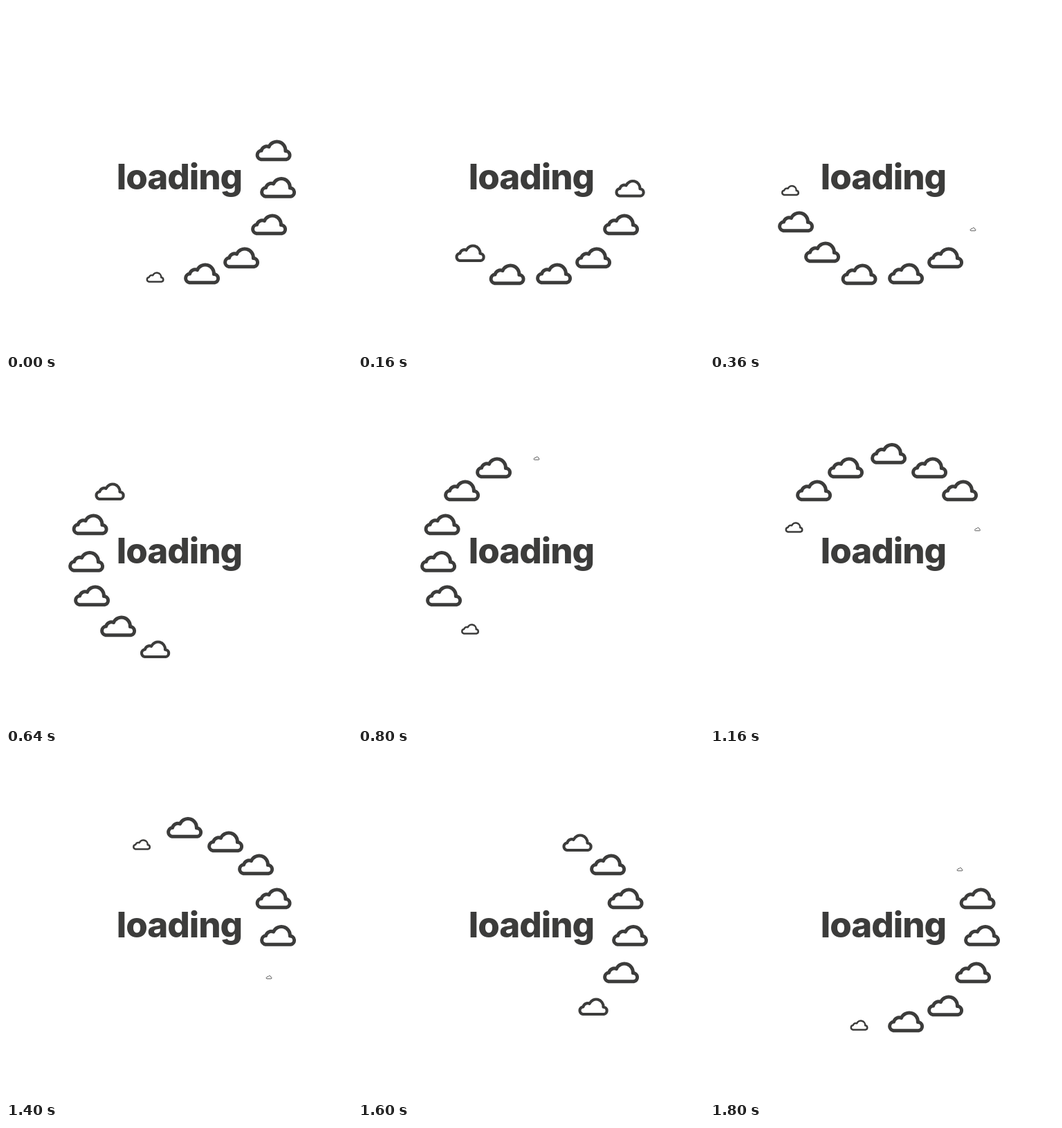
These frames come from a looping animation (500 by 500 pixels, 1.84 s). An HTML page:

```html
<!DOCTYPE html>
<html lang="en">
<head>
<meta charset="utf-8">
<title>loading</title>
<style>
  html, body { margin: 0; width: 100%; height: 100%; overflow: hidden; background: #fff; }
  svg { display: block; width: 100%; height: 100%; }
  text { font: 800 51px Inter, sans-serif; letter-spacing: -.02em; fill: #3c3c3b; text-anchor: middle; }
  path { fill: none; stroke: #3c3c3b; stroke-width: 5; stroke-linejoin: round; }
</style>
</head>
<body>
<svg viewBox="0 0 500 500"><text x="250.5" y="265">loading</text></svg>
<script>
const FRAME = 40, FRAMES = 46, STEP = 3, LEAD = 5;
const CLOUD = 'M-18 4.8H18.5A6.2 6.2 0 0 0 17.4 -7.5A12.5 12.5 0 0 0 -6.5 -13.5' +
  'A8 8 0 0 0 -17.5 -7.9A6.4 6.4 0 0 0 -18 4.8Z';

// Anchor points, clockwise from the right
const spots = [
  [386.5, 217], [393, 270.5], [380, 324], [340, 372], [283, 395],
  [215.5, 396], [162, 364], [124, 320], [116, 270.5], [121.5, 217],
  [150, 168], [196, 135], [258, 114.5], [317, 135], [361, 168]
];

const svg = document.querySelector('svg');
const clouds = spots.map(() => {
  const path = document.createElementNS(svg.namespaceURI, 'path');
  path.setAttribute('d', CLOUD);
  return svg.appendChild(path);
});

const clamp = v => Math.max(0, Math.min(1, v));

// Each cloud grows as the head of the train arrives and shrinks after its tail
function size(i, frame) {
  const grow = clamp((frame - STEP * (i - LEAD)) / STEP + .5);
  const shrink = clamp((STEP * i + 2 - frame) / STEP + .5);
  return Math.min(grow, shrink);
}

function draw() {
  const frame = Math.floor(performance.now() / FRAME) % FRAMES;
  clouds.forEach((cloud, i) => {
    const s = Math.max(size(i, frame), size(i + spots.length, frame));
    cloud.style.display = s > .01 ? '' : 'none';
    cloud.setAttribute('transform', `translate(${spots[i]}) scale(${s})`);
  });
  requestAnimationFrame(draw);
}
draw();
</script>
</body>
</html>
```
